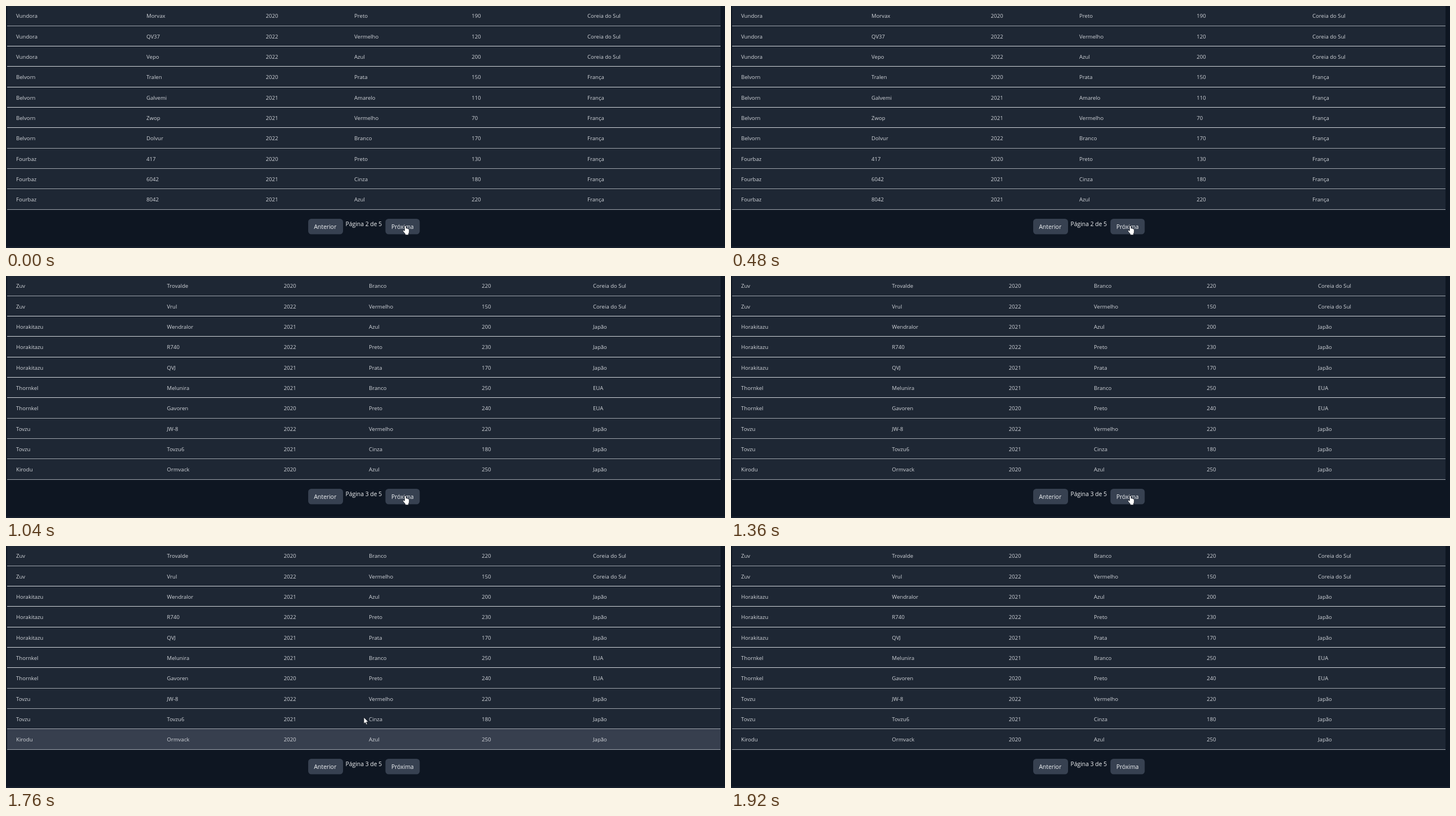
Recreate the animation shown at these times as an HTML page. Size 1280 by 431 pixels, loop 2 s.

```html
<!DOCTYPE html>
<html lang="pt-BR">
<head>
<meta charset="utf-8">
<title>Tabela de carros</title>
<style>
  html, body { margin: 0; width: 100%; height: 100%; overflow: hidden; background: #0e1622; }
  svg { display: block; }
  text { font: 9.6px "Open Sans", "Noto Sans", sans-serif; fill: #d2d5da; }
  .pager text { font-size: 10.4px; font-weight: 500; fill: #f1f3f5; }
  .pager rect { fill: #374151; }
  .cursor { fill: #fff; stroke: #10151d; stroke-width: .8; stroke-linejoin: round; }
</style>
</head>
<body>
<svg id="stage" width="1280" height="431" viewBox="0 0 1280 431"></svg>
<script>
const LOOP = 2000, STEP = 80, ROW = 36.3;
const PAGE_CHANGE = 800;

const pages = [
  { number: 2, columns: [18, 250, 462.5, 620, 829, 1035], rows: `
Vundora|Morvax|2020|Preto|190|Coreia do Sul
Vundora|QV37|2022|Vermelho|120|Coreia do Sul
Vundora|Vepo|2022|Azul|200|Coreia do Sul
Belvorn|Tralen|2020|Prata|150|França
Belvorn|Galvemi|2021|Amarelo|110|França
Belvorn|Zwop|2021|Vermelho|70|França
Belvorn|Dolvur|2022|Branco|170|França
Fourbaz|417|2020|Preto|130|França
Fourbaz|6042|2021|Cinza|180|França
Fourbaz|8042|2021|Azul|220|França` },
  { number: 3, columns: [18, 286.5, 494.5, 646, 847, 1045], rows: `
Zuv|Trovalde|2020|Branco|220|Coreia do Sul
Zuv|Vrul|2022|Vermelho|150|Coreia do Sul
Horakitazu|Wendralor|2021|Azul|200|Japão
Horakitazu|R740|2022|Preto|230|Japão
Horakitazu|QVJ|2021|Prata|170|Japão
Thornkel|Melunira|2021|Branco|250|EUA
Thornkel|Gavoren|2020|Preto|240|EUA
Tovzu|JW-8|2022|Vermelho|220|Japão
Tovzu|Tovzu6|2021|Cinza|180|Japão
Kirodu|Ormvack|2020|Azul|250|Japão` },
];

// Pointer position and highlighted row once the pointer leaves the button
const pointerSteps = [
  { time: 1680, x: 671, y: 366 },
  { time: 1760, x: 637, y: 305, hover: 9 },
  { time: 1840, x: 601, y: 133, hover: 7 },
  { time: 1920, x: 560, y: -60 },
];

const text = (x, y, value) => `<text x="${x}" y="${y}">${value}</text>`;
const rect = (x, y, w, h, attrs) =>
  `<rect x="${x}" y="${y}" width="${w}" height="${h}" ${attrs}/>`;
const lineY = i => Math.floor(35.3 + ROW * i);

function pageMarkup({ number, columns, rows }) {
  const cells = rows.trim().split("\n").map((row, i) =>
    row.split("|").map((value, c) => text(columns[c], 21.4 + ROW * i, value)).join(""));
  return `<g class="page">${cells.join("")}
    <g class="pager">${text(604.5, 391.7, `Página ${number} de 5`)}</g></g>`;
}

const lines = Array.from({ length: 10 }, (_, i) =>
  rect(2, lineY(i), 1270, 1, `fill="${i > 0 && i < 6 ? "#d3d7dc" : "#9ea4ac"}"`)).join("");

const stage = document.getElementById("stage");
stage.innerHTML = `
  ${rect(0, 0, 1280, 431, 'fill="#0e1622"')}
  ${rect(2, 0, 1270, 362, 'fill="#1e2734"')}
  ${rect(2, 0, 1270, 36, 'id="hover" fill="#373f4e"')}
  ${lines}
  ${rect(0, 429, 1280, 1, 'fill="#1f2937"')}
  <g class="pager">
    ${rect(538, 379, 62, 27.5, 'rx="5.5"')}${text(548.3, 397.2, "Anterior")}
    ${rect(675.5, 379, 61, 27.5, 'rx="5.5"')}${text(686, 397.2, "Próxima")}
  </g>
  ${pages.map(pageMarkup).join("")}
  <path id="hand" class="cursor" d="M709.6 400.5V392.8q0-1.5 1.4-1.5t1.4 1.5V396
    q1.4-.7 1.9.5 1.3-.6 1.8.6 1.7-.2 1.7 1.4v3.7q0 1.7-1.2 3.2v2.4h-5.8v-1.6
    l-3.8-4.8q-1-1.6.2-2.1 1-.4 2.4 1.2Z"/>
  <path id="arrow" class="cursor" d="M0 0V11.6L2.6 9.2 4.5 13.3 6.3 12.5 4.5 8.4H8.1Z"/>`;

const [hover, hand, arrow] = ["hover", "hand", "arrow"].map(id => document.getElementById(id));
const pageGroups = stage.querySelectorAll(".page");
const show = (element, visible) => element.setAttribute("visibility", visible ? "visible" : "hidden");

function draw(now) {
  const time = Math.floor((now % LOOP) / STEP) * STEP;
  const current = time < PAGE_CHANGE ? 0 : 1;
  pageGroups.forEach((group, i) => show(group, i === current));

  const pointer = pointerSteps.findLast(step => time >= step.time);
  const row = pointer?.hover;
  show(hand, !pointer);
  show(arrow, pointer);
  show(hover, row !== undefined);
  if (pointer) arrow.setAttribute("transform", `translate(${pointer.x} ${pointer.y})`);
  if (row !== undefined) {
    hover.setAttribute("y", lineY(row - 1) + 1);
    hover.setAttribute("height", lineY(row) - lineY(row - 1) - 1);
  }
}

const start = performance.now();
(function tick() {
  draw(performance.now() - start);
  requestAnimationFrame(tick);
})();
</script>
</body>
</html>
```
